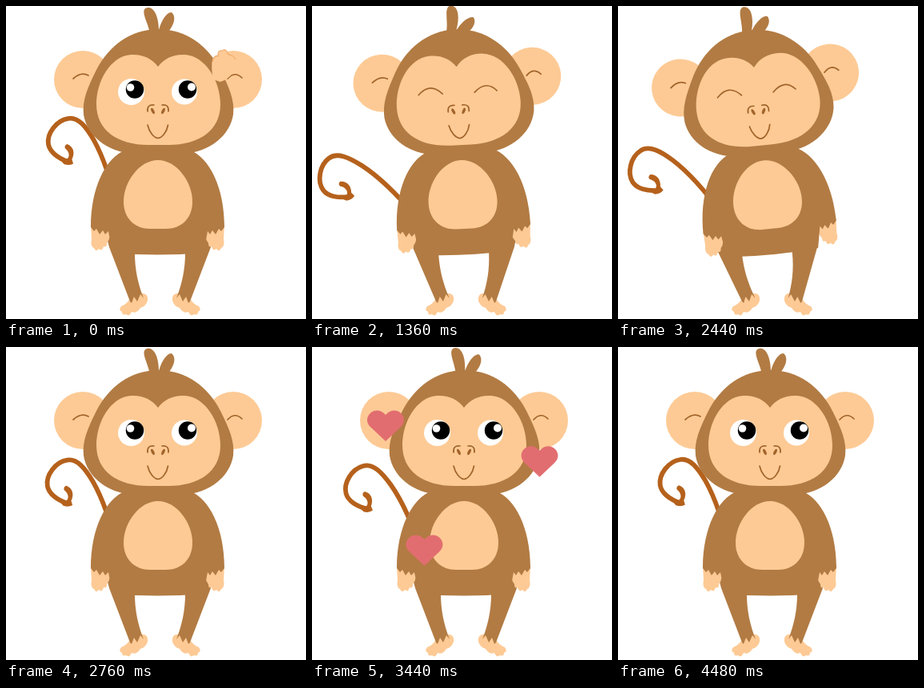
Animation, 375 px wide and 392 px high, one loop 4.52 s. Source, as an HTML page:

```html
<!DOCTYPE html>
<html lang="en">
<head>
<meta charset="utf-8">
<title>Monkey</title>
<style>
html, body { margin: 0; width: 100%; height: 100%; overflow: hidden; background: #fff; }
svg { display: block; width: 375px; height: 392px; }
.fur { fill: #b27b43; }
.skin { fill: #fdca95; }
.line { fill: none; stroke: #a1642a; stroke-width: 1.7; stroke-linecap: round; }
.heart { fill: #e26d70; }
</style>
</head>
<body>
<svg viewBox="0 0 375 392">
  <defs>
    <path id="foot" class="skin" d="M154 368L160 360L172 360Q178 361 177 369Q175 376 168 378Q163 386 157 383Q154 390 150 386Q145 388 145 383Q140 381 144 376Q150 374 154 368Z"/>
    <path id="leg" class="fur" d="M126 290L129 302L155 370L157 372L160 364L164 370L168 361L172 366C165 348 161 330 161 309L164 285Z"/>
    <path id="hand" class="skin" d="M106 274L129 274Q132 291 126 297Q126 303 122 301Q120 308 116 304Q112 309 110 303Q105 301 107 292Z"/>
    <path id="heart" class="heart" d="M0 20L-18 3C-32 -9 -13 -28 0 -13C13 -28 32 -9 18 3Z"/>
  </defs>

  <g id="tail">
    <path d="M128 262C107 237 82 213 62 200C46 190 31 183 21 191C9 200 6 220 14 231C20 239 33 241 46 239" fill="none" stroke="#b5611c" stroke-width="5.800"/>
    <path d="M28 238L43 237C46 233 42 227 35 226Q32 223 35 220C44 219 49 226 49 234L53 238Q50 243 43 244Z" fill="#b5611c"/>
  </g>

  <use href="#foot"/>
  <use href="#foot" transform="matrix(-1 0 0 1 385 0)"/>
  <g id="legs">
    <use href="#leg"/>
    <use href="#leg" transform="matrix(-1 0 0 1 385 0)"/>
  </g>

  <g id="upper">
    <use href="#hand"/>
    <use href="#hand" transform="matrix(-1 0 0 1 379 0)"/>
    <path class="fur" d="M150 180C124 190 106 228 106 277L110 282L113 279L117 286L121 281L124 286L128 282L133 309Q190 314 247 309L252 282L255 286L258 281L262 286L266 279L269 282L273 277C273 228 255 190 229 180Z"/>
    <path class="skin" d="M190 193C167 193 147 220 147 245C147 266 161 279 180 279L200 279C219 279 233 266 233 245C233 220 213 193 190 193Z"/>

    <circle class="skin" cx="96" cy="92" r="36"/>
    <circle class="skin" cx="284" cy="92" r="36"/>
    <path class="line" d="M84 91Q94 82 103 87M277 91Q286 81 295 90"/>
    <g id="hair" class="fur">
      <path d="M180 38C180 24 168 9 174 3C183 -2 192 10 191 36Z"/>
      <path d="M190 36C192 20 201 7 207 8C214 14 209 27 199 36Z"/>
    </g>
    <path class="fur" d="M190.500 29C156 29 128 50 113 80C102 102 95 118 97 136C101 162 126 183 160 185L221 185C255 183 280 162 284 136C286 118 279 102 268 80C253 50 225 29 190.500 29Z"/>
    <path class="skin" d="M190 76C182 65 170 60 156 61C130 63 113 95 113 123C113 156 140 174 178 174L203 174C241 174 268 156 268 123C268 95 250 63 224 61C210 60 198 65 190 76Z"/>

    <g id="open">
      <g fill="#fff"><circle cx="156.500" cy="107.500" r="16.500"/><circle cx="223" cy="107.500" r="16"/></g>
      <circle cx="161" cy="104.500" r="11.200"/><circle cx="227" cy="104.500" r="11.200"/>
      <g fill="#fff"><circle cx="155.500" cy="102" r="4.800"/><circle cx="232" cy="101.500" r="5"/></g>
    </g>
    <path id="closed" class="line" d="M141 109Q156 93 171 109M211 109Q226 94 239 108"/>

    <path class="line" d="M177 132Q176 123 185 124M195 124Q204 123 203 132M177 149C179 158 185 165 190 165.500C195 165 201 158 202.500 149"/>
    <g fill="#a1642a">
      <ellipse cx="183.500" cy="131.500" rx="1.800" ry="4" transform="rotate(-25 183.500 131.500)"/>
      <ellipse cx="196.500" cy="131.500" rx="1.800" ry="4" transform="rotate(25 196.500 131.500)"/>
    </g>
  </g>

  <g id="raised">
    <path class="skin" d="M259 92Q256 76 258 67Q261 60 265 62Q264 54 270 56Q275 51 278 60Q287 62 288 72Q284 90 268 95Z"/>
    <path d="M258 70Q260 61 265 63Q264 55 270 56Q275 52 278 61Q284 61 287 67" fill="none" stroke="#eda463" stroke-width="1"/>
  </g>

  <use id="ear" href="#heart"/>
  <use id="cheek" href="#heart"/>
  <use id="arm" href="#heart"/>
</svg>
<script>
const LOOP = 4520, STEP = 40;
const el = id => document.getElementById(id);
const ramp = (t, a, b) => Math.min(1, Math.max(0, (t - a) / (b - a)));
const move = (id, transform) => el(id).setAttribute('transform', transform);
const show = (id, on) => el(id).setAttribute('visibility', on ? 'visible' : 'hidden');

// Times at which the tail is alternately raised and lowered
const turns = [0, 440, 870, 1340, 1790, 2340, 2720, 3140, 3570, 4010, 4500, LOOP + 400];

function swing(t) {
  const i = turns.findIndex(x => x > t) - 1;
  const wave = (1 - Math.cos(Math.PI * ramp(t, turns[i], turns[i + 1]))) / 2;
  return i % 2 ? 1 - wave : wave;
}

function heart(id, t, x, y, [in0, in1, out0, out1]) {
  move(id, `translate(${x} ${y})`);
  el(id).setAttribute('opacity', ramp(t, in0, in1) * (1 - ramp(t, out0, out1)));
}

function draw(t) {
  const s = swing(t);
  move('tail', `rotate(${28 * (1 - s)} 150 280)`);
  move('hair', `rotate(${20 * s} 190 32)`);

  const laugh = t >= 1280 && t < 2740;
  const lean = t > 1290 && t < 2730 ? -6.1 * Math.sin((t - 1290) / 960 * 2 * Math.PI) : 0;
  move('upper', `rotate(${lean} 190 275)`);
  move('legs', `translate(0 370) skewX(${-lean}) translate(0 -370)`);
  show('open', !laugh);
  show('closed', laugh);
  show('raised', t < 1240);

  heart('ear', t, 92, 98, [3040, 3300, 3540, 3780]);
  heart('cheek', t, 284.5, 131 + (t - 3120) * 0.0365, [2800, 2960, 3820, 4140]);
  heart('arm', t, 140.5, 254, [2800, 2960, 3700, 4060]);
}

let start;
function tick(now) {
  start ??= now;
  draw(Math.floor((now - start) % LOOP / STEP) * STEP);
  requestAnimationFrame(tick);
}
draw(0);
requestAnimationFrame(tick);
</script>
</body>
</html>
```
